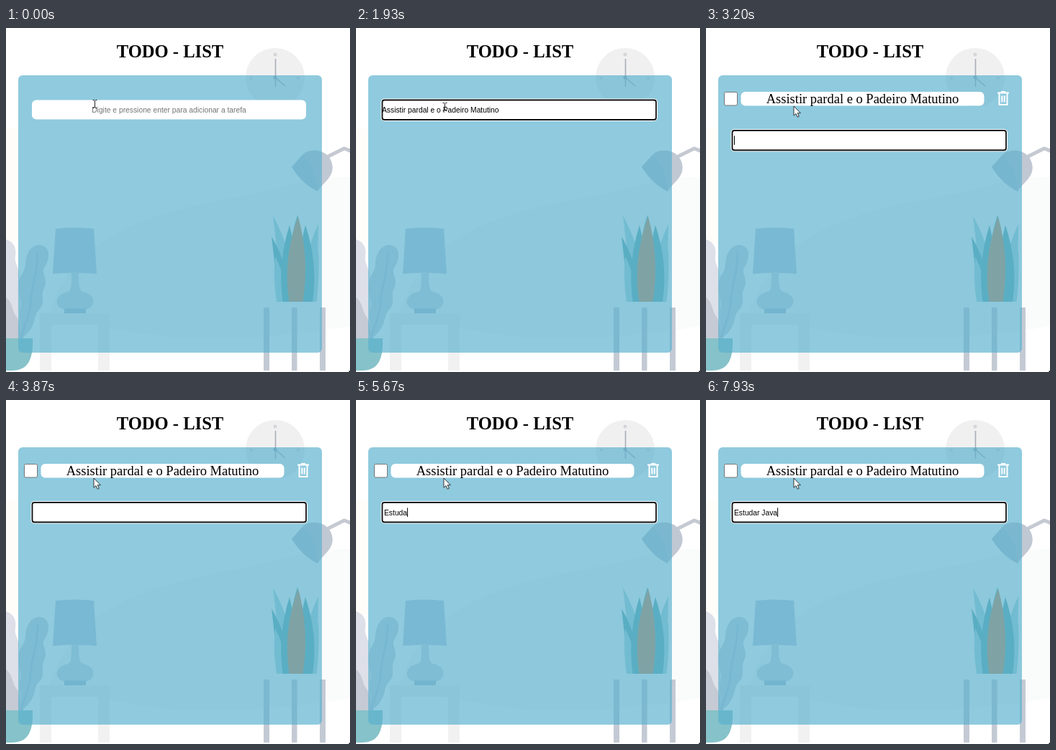
These frames come from a looping animation (478 px wide and 480 px high, 8000 ms). An HTML page:

```html
<!DOCTYPE html>
<html lang="pt">
<meta charset="utf-8">
<title>Todo list</title>
<style>
  html, body { margin: 0; width: 100%; height: 100%; overflow: hidden; background: #fff }
  svg { display: block; width: 478px; height: 480px }
  text { white-space: pre }
  .serif { font-family: "Liberation Serif", serif; text-anchor: middle }
  .sans { font: 10.3px "Liberation Sans", sans-serif }
</style>
<svg viewBox="0 0 478 480">
  <!-- room -->
  <path fill="#fffdfa" d="M0 140H17V300H0Z"/>
  <path fill="#fafbfb" d="M60 400C90 300 180 262 300 240S410 208 478 208V416C420 426 300 440 220 430S100 410 60 400"/>
  <circle cx="374" cy="69" r="41" fill="#f0f0f0"/>
  <g fill="#d5d6d9"><circle cx="374" cy="37" r="2.5"/><circle cx="341" cy="70" r="2"/><circle cx="406" cy="70" r="2"/></g>
  <path fill="none" stroke="#a9adb8" stroke-width="1.6" d="M374.500 43V82M374 69L388 81"/>
  <circle cx="374" cy="69" r="2.500" fill="#a0a5b2"/>
  <path fill="none" stroke="#c5c9d2" stroke-width="5" stroke-linejoin="round" d="M480 172L470 168L444 181"/>
  <path fill="#c0c8d3" d="M397 194L414 175C426 167 448 170 453 189C457 207 443 213 433 228Z"/>
  <path fill="#b5c2d1" d="M397 194L412 177Q434 198 433 228Q412 218 397 194"/>
  <g id="plant"></g>
  <path fill="#c4cad4" d="M358 390h8v88h-8zM397 390h7.500v88h-7.500zM436 390h8v88h-8z"/>
  <path fill="#f1f1f1" d="M47 398H144V478H128V414H63V478H47Z"/>
  <path fill="#becbde" d="M69 280Q95 277 122 280L126 343Q95 340 65 343Z"/>
  <path fill="#cfd8e4" d="M91 342H101C101 360 102 366 107 368C127 372 125 392 109 393H83C66 391 66 372 86 368C91 366 91 360 91 342"/>
  <path fill="#a9bccd" d="M81 391.500H111V398H81Z"/>
  <path fill="#dde0e8" d="M0 295C10 298 15 306 13 318C11 330 21 336 18 350C15 362 24 372 20 384L24 433H8L0 390Z"/>
  <path fill="#c5cad4" d="M0 376C10 384 8 394 14 402C21 411 18 423 24 433H0Z"/>
  <path fill="#cad4e2" d="M18 433C25 416 16 405 20 392C24 380 15 371 17 357C19 343 26 344 27 329C28 311 38 301 49 303C62 306 61 322 54 333C47 342 60 350 53 363C47 374 56 383 46 393C36 403 45 415 22 433Z"/>
  <path fill="none" stroke="#b6c4d5" stroke-width="3" d="M44 313C44 345 35 360 34 383S24 415 21 433"/>
  <path fill="#86c2c9" d="M0 433H37C38 462 31 478 8 478H0Z"/>
  <rect x="17" y="66" width="422" height="387" rx="6" fill="#5ab1ce" fill-opacity=".68"/>
  <path d="M476.500 478.500h2v2h-2z"/>

  <text class="serif" x="228" y="40.500" font-size="24.600" font-weight="bold">TODO - LIST</text>

  <g id="item">
    <rect x="25.500" y="89.500" width="18" height="18.500" rx="2" fill="#fff" stroke="#767676"/>
    <rect x="48.500" y="89" width="338" height="19.500" rx="6" fill="#fff"/>
    <text class="serif" x="217.500" y="105" font-size="18.500">Assistir pardal e o Padeiro Matutino</text>
  </g>
  <g id="trash" fill="none" stroke="#fff" stroke-width="2">
    <path d="M405 90.500H421M410 89H416M407.500 91V107H418.500V91M411.300 94.500V103.500M414.700 94.500V103.500"/>
  </g>

  <g id="field">
    <rect x="36" y="100.500" width="381" height="27" rx="6" fill="#fff"/>
    <g id="ring" fill="#fff">
      <rect x="36.500" y="100.500" width="380.500" height="27.500" rx="3" stroke="#fff" stroke-width="4"/>
      <rect x="36.500" y="100.500" width="380.500" height="27.500" rx="3" stroke="#101010" stroke-width="1.800"/>
    </g>
    <text id="hint" class="sans" x="226.500" y="118" text-anchor="middle" fill="#757575">Digite e pressione enter para adicionar a tarefa</text>
    <text id="typed" class="sans" y="118"></text>
    <rect id="caret" y="108" width="1" height="12.500"/>
  </g>

  <path id="beam" fill="none" stroke="#222" d="M120.500 .500H122.500L123.500 1.500L124.500 .500H126.500M123.500 1V11M120.500 11.500H122.500L123.500 10.500L124.500 11.500H126.500"/>
  <path id="arrow" fill="#fff" stroke="#222" stroke-width=".9" stroke-linejoin="round" d="M122 109V122.300L125 119.500L127.200 124.300L129.300 123.300L127.200 118.700H131.300Z"/>
</svg>
<script>
  const LOOP = 8000, PASTE = 1270, ADD = 2000, TRASH = 2200;
  const task = 'Assistir pardal e o Padeiro Matutino', next = 'Estudar Java';
  const keyTimes = [4260, 4460, 5050, 5250, 5400, 5600, 5900, 6120, 6350, 6650, 6970, 7450];
  const el = id => document.getElementById(id);
  const show = (id, on) => el(id).style.display = on ? '' : 'none';

  // A blade grows from its base to a bent, pointed tip.
  const blade = (tipX, tipY, x, w, color) => {
    const y = (tipY + 382) / 2;
    return `<path fill="${color}" d="M${x - w / 2} 382Q${x - w} ${y} ${tipX} ${tipY}Q${x + w} ${y} ${x + w / 2} 382Z"/>`;
  };
  const light = '#a5d3d8', dark = '#5aa9ac';
  el('plant').innerHTML = [
    [371, 262, 391, 13, light], [434, 274, 421, 13, light], [369, 291, 385, 11, dark],
    [374, 319, 381, 10, light], [434, 309, 427, 9, light], [394, 275, 392, 15, dark],
    [416, 275, 418, 16, dark], [405, 261, 404, 18, dark], [406, 263, 403, 19, '#ce864e']
  ].map(b => blade(...b)).join('');

  function draw(now) {
    const t = now % LOOP, added = t >= ADD;
    const keys = keyTimes.filter(k => k <= t);
    const lastInput = keys.length ? keys[keys.length - 1] : ADD;
    show('item', added);
    show('trash', t >= TRASH);
    show('ring', t >= 400);
    show('hint', t < PASTE);
    show('beam', !added);
    show('arrow', added);
    show('caret', added && (t - lastInput) % 1000 < 500);
    el('field').setAttribute('transform', `translate(0 ${added ? 42.5 : 0})`);
    el('beam').setAttribute('transform', `translate(0 ${t < 100 ? 100 : 104})`);

    const typed = el('typed'), x = added ? 39 : 36;
    typed.textContent = added ? next.slice(0, keys.length) : t >= PASTE ? task : '';
    typed.setAttribute('x', x);
    el('caret').setAttribute('x', x + (keys.length ? typed.getComputedTextLength() : 0));
    requestAnimationFrame(draw);
  }
  requestAnimationFrame(draw);
</script>
</html>
```
